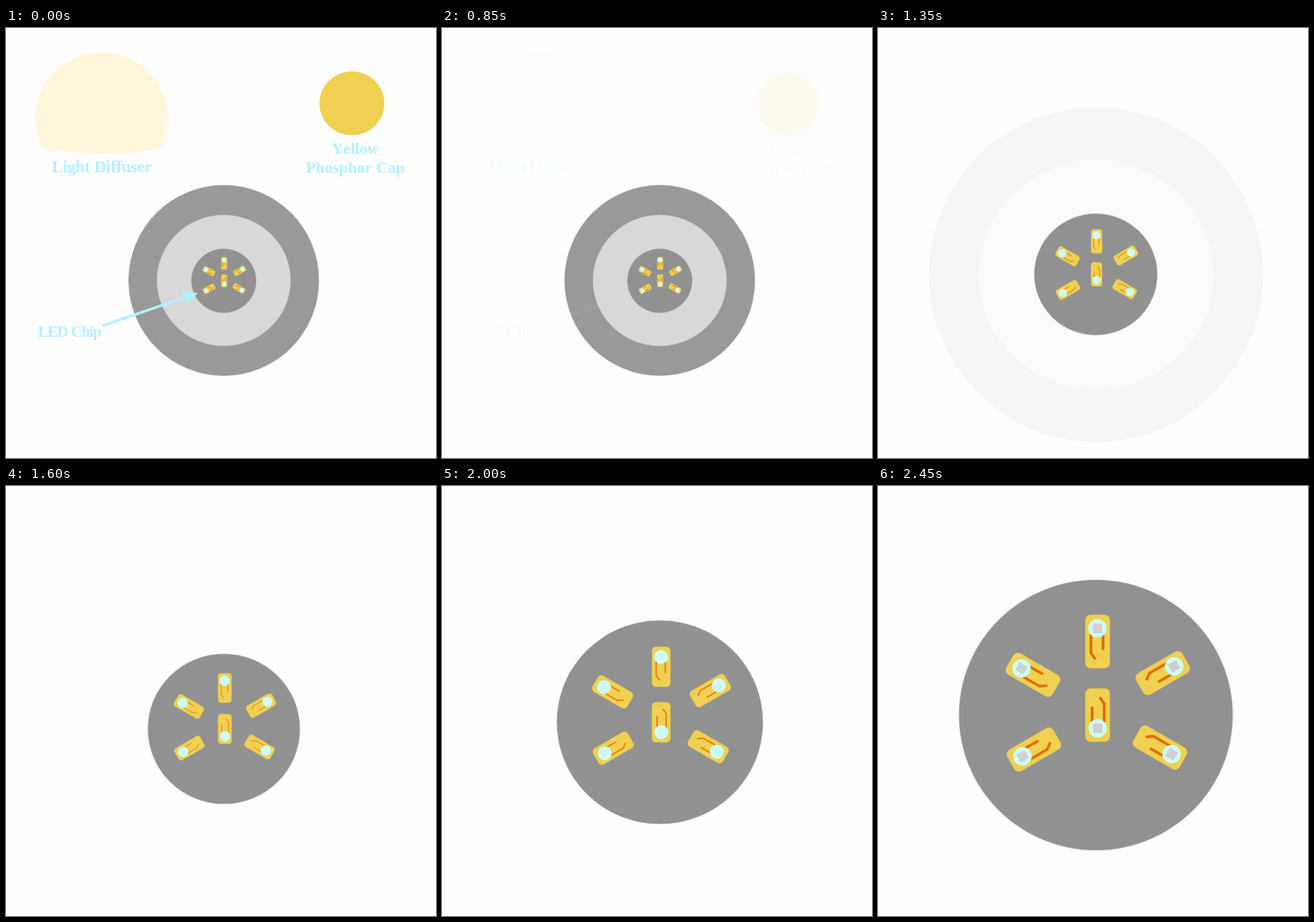
An HTML page for the animation above (4.45 s loop, 749 by 748 pixels).

```html
<!DOCTYPE html>
<html lang="en">
<head>
<meta charset="utf-8">
<title>LED bulb layers</title>
<style>
  html, body { margin: 0; width: 100%; height: 100%; overflow: hidden; background: #fefefe; }
  svg { display: block; width: 100%; height: 100%; }

  .labels, .rings, .board, .dies { animation: 4450ms linear infinite; }
  .labels { animation-name: labels; }
  .rings { animation-name: rings; }
  .board { animation-name: zoom; }
  .dies { animation-name: dies; }

  text {
    font: bold 28px "Liberation Serif", "Times New Roman", serif;
    font-kerning: none;
    text-anchor: middle;
    fill: #b3f0ff;
  }
  .large { font-size: 28.6px; }
  .small { font-size: 26.5px; letter-spacing: -.9px; }

  /* Everything advances in 50 ms steps */
  @keyframes labels {
    0%, 10.11% { opacity: 1; animation-timing-function: steps(5, end); }
    15.73% { opacity: .32; animation-timing-function: steps(3, end); }
    19.1% { opacity: .08; animation-timing-function: steps(2, end); }
    21.34%, 100% { opacity: 0; }
  }
  @keyframes rings {
    0%, 21.34% {
      opacity: 1; transform: translate(379.3px, 439.1px) scale(1);
      animation-timing-function: steps(4, end);
    }
    25.84% {
      opacity: .42; transform: translate(379.5px, 433.5px) scale(1.4187);
      animation-timing-function: steps(4, end);
    }
    30.33% {
      opacity: .08; transform: translate(379.8px, 428.9px) scale(1.753);
      animation-timing-function: steps(2, end);
    }
    32.58%, 100% { opacity: 0; transform: translate(380px, 426.9px) scale(1.898); }
  }
  @keyframes zoom {
    0%, 21.34% {
      transform: translate(379.3px, 439.6px) scale(.2369); stroke-width: 4.2px;
      animation-timing-function: steps(4, end);
    }
    25.84% {
      transform: translate(379.2px, 433.8px) scale(.3592); stroke-width: 2.8px;
      animation-timing-function: steps(6, end);
    }
    32.58% {
      transform: translate(379.4px, 426px) scale(.4948); stroke-width: 2px;
      animation-timing-function: steps(3, end);
    }
    35.95% {
      transform: translate(379.5px, 422.5px) scale(.5556); stroke-width: 1.8px;
      animation-timing-function: steps(7, end);
    }
    43.82% {
      transform: translate(379.5px, 412.4px) scale(.728); stroke-width: 2.4px;
      animation-timing-function: steps(3, end);
    }
    47.19% {
      transform: translate(379.5px, 408px) scale(.803); stroke-width: 2.9px;
      animation-timing-function: steps(7, end);
    }
    55.05%, 100% { transform: translate(379.5px, 398.5px) scale(1); stroke-width: 4.6px; }
  }
  @keyframes dies {
    0%, 43.82% { opacity: 0; animation-timing-function: steps(5, end); }
    49.43% { opacity: .68; animation-timing-function: steps(5, end); }
    55.05%, 100% { opacity: 1; }
  }
</style>
</head>
<body>
<svg viewBox="0 0 749 748" preserveAspectRatio="none">
  <defs>
    <g id="chip">
      <rect x="-21.5" y="-46.5" width="43" height="93" rx="9.5" fill="#f0d050"/>
      <path d="M-11.5 -14V20L-3.5 31M9.5 -14V14.5" fill="none" stroke="#e06a00"/>
      <circle cx="-.3" cy="-23" r="16" fill="#ccfffb"/>
    </g>
    <g id="die">
      <rect x="-8" y="-31" width="15.5" height="16" fill="#dcd8d9"/>
      <path d="M-7.5 -31v16M-4 -31v16M-.3 -31v16M3.4 -31v16M7 -31v16
               M-8 -30.5h15.5M-8 -26.7h15.5M-8 -23h15.5M-8 -19.2h15.5M-8 -15.5h15.5"
            stroke="#c9c5c7" stroke-width="1"/>
    </g>
  </defs>

  <g class="rings">
    <circle r="166" fill="#999"/>
    <ellipse rx="116.5" ry="114" fill="#d8d8d8"/>
  </g>

  <g class="board">
    <ellipse rx="238.5" ry="235.2" fill="#919191"/>
    <use href="#chip" transform="translate(3 -128)"/>
    <use href="#chip" transform="translate(3 0) rotate(180)"/>
    <use href="#chip" transform="translate(-109.5 -70) rotate(-60)"/>
    <use href="#chip" transform="translate(116.5 -73) rotate(60)"/>
    <use href="#chip" transform="translate(-108 60) rotate(-120)"/>
    <use href="#chip" transform="translate(111.7 56.7) rotate(120)"/>
    <g class="dies">
      <use href="#die" transform="translate(3 -128)"/>
      <use href="#die" transform="translate(3 0) rotate(180)"/>
      <use href="#die" transform="translate(-109.5 -70) rotate(-60)"/>
      <use href="#die" transform="translate(116.5 -73) rotate(60)"/>
      <use href="#die" transform="translate(-108 60) rotate(-120)"/>
      <use href="#die" transform="translate(111.7 56.7) rotate(120)"/>
    </g>
  </g>

  <g class="labels">
    <path d="M62.5 205A115.5 113 0 1 1 270.5 205Q271.5 206.5 269 207.5C240 221.5 93 221.5 64 207.5Q61.5 206.5 62.5 205Z" fill="#fff6db"/>
    <ellipse cx="602.5" cy="131" rx="56.5" ry="55.5" fill="#f0d050"/>
    <text x="167" y="251" class="large">Light Diffuser</text>
    <text x="608.5" y="219">Yellow</text>
    <text x="608.5" y="252">Phosphor Cap</text>
    <text x="110.6" y="537" class="small">LED Chip</text>
    <path d="M168 518L316 467.2" stroke="#b3f0ff" stroke-width="4.6"/>
    <path d="M334 461L303.5 457.5L314 467.8L313 483Z" fill="#b3f0ff"/>
  </g>
</svg>
</body>
</html>
```
